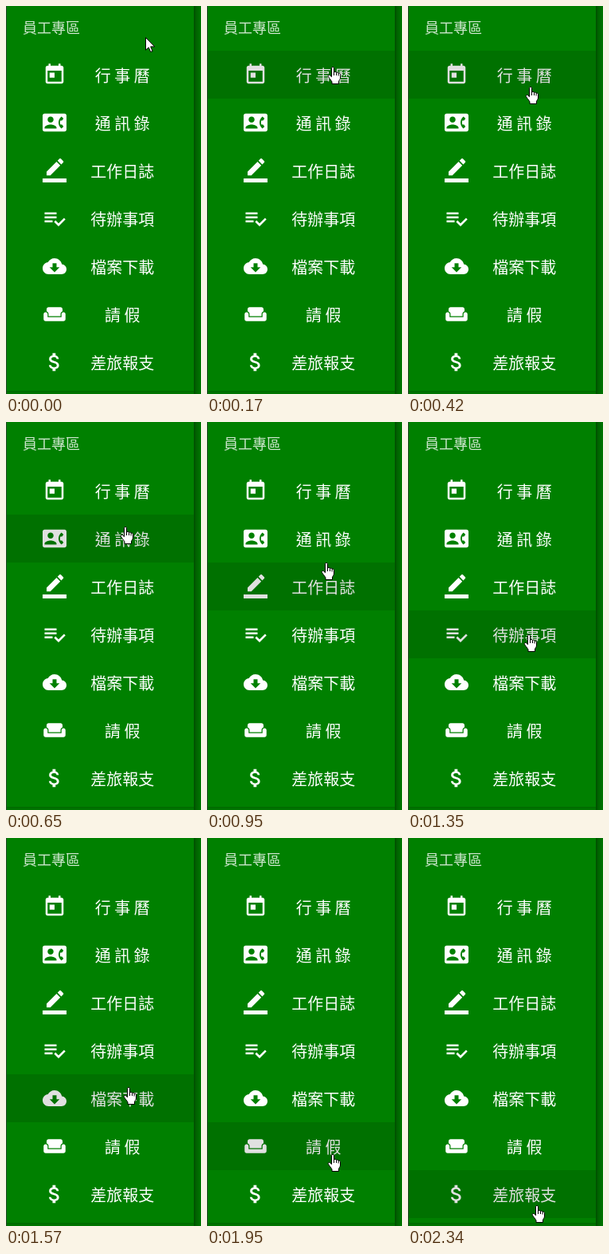
These frames come from a looping animation (245 px wide and 486 px high, 2490 ms). An HTML page:

```html
<!DOCTYPE html>
<html lang="zh-Hant">
<head>
<meta charset="utf-8">
<title>員工專區</title>
<style>
html, body { margin: 0; width: 100%; height: 100%; overflow: hidden; background: #008000; }
svg { display: block; width: 100%; height: 100%; }
text { font-family: "Noto Sans CJK TC", "Noto Sans CJK", "Noto Sans CJK JP", sans-serif; font-weight: 300; fill: #fff; }
.item { font-size: 20px; text-anchor: middle; }
</style>
</head>
<body>
<svg viewBox="0 0 245 486" xmlns="http://www.w3.org/2000/svg">
  <defs>
    <linearGradient id="side">
      <stop offset="0" stop-opacity=".4"/>
      <stop offset=".35" stop-opacity=".22"/>
      <stop offset="1" stop-opacity=".08"/>
    </linearGradient>
    <linearGradient id="foot" x2="0" y2="1">
      <stop offset="0" stop-opacity=".18"/>
      <stop offset="1" stop-opacity=".06"/>
    </linearGradient>
  </defs>
  <rect width="245" height="486" fill="#008000"/>
  <rect x="236" width="9" height="486" fill="url(#side)"/>
  <rect y="482" width="236" height="4" fill="url(#foot)"/>
  <text x="21" y="33.5" font-size="18" fill-opacity=".8">員工專區</text>
  <g id="menu"></g>
  <rect id="hover" width="236" height="60" fill-opacity=".12"/>
  <rect width="1" height="486" fill="#244a28"/>
  <g id="cursor" fill="#fff" stroke="#000" stroke-linejoin="round">
    <path id="arrow" d="M.5 .5V16.2L4.2 12.8 6.7 18.5 9.1 17.5 6.7 11.9H11.7Z"/>
    <path id="hand" d="M-1.5 1.5c0-1.3 3-1.3 3 0V7c.5-1 2.7-.8 3 .6.6-.9 2.5-.5 2.6.8.8-.6 2.4-.2 2.4 1.2v4.4c0 2-2 3-2 5v2.5H-1v-2.5c-1-2-3.5-4.5-4.6-6.6-.8-1.5 1-2.6 2.2-1.6l1.9 1.9z"/>
    <path id="creases" d="M1.5 7v4M4.5 7.6V11M7.1 8.4V11.5" fill="none"/>
  </g>
</svg>
<script>
const TOP = 56, ROW = 60, LOOP = 2490;

const items = [
  ["行 事 曆", "M19 3h-1V1h-2v2H8V1H6v2H5c-1.11 0-1.99.9-1.99 2L3 19c0 1.1.89 2 2 2h14c1.1 0 2-.9 2-2V5c0-1.1-.9-2-2-2zm0 16H5V8h14v11zM7 10h5v5H7z"],
  ["通 訊 錄", "M22 3H2C.9 3 0 3.9 0 5v14c0 1.1.9 2 2 2h20c1.1 0 1.99-.9 1.99-2L24 5c0-1.1-.9-2-2-2zM8 6c1.66 0 3 1.34 3 3s-1.34 3-3 3-3-1.34-3-3 1.34-3 3-3zm6 12H2v-1c0-2 4-3.1 6-3.1s6 1.1 6 3.1v1zm3.85-4h1.64L21 16l-1.99 1.99c-1.31-.98-2.28-2.38-2.73-3.99-.18-.64-.28-1.31-.28-2s.1-1.36.28-2c.45-1.62 1.42-3.01 2.73-3.99L21 8l-1.51 2h-1.64c-.22.63-.35 1.3-.35 2s.13 1.37.35 2z"],
  ["工作日誌", "M17.75 7L14 3.25l-10 10V17h3.75l10-10zm2.96-2.96c.39-.39.39-1.02 0-1.41L18.37.29c-.39-.39-1.02-.39-1.41 0L15 2.25 18.75 6l1.96-1.96zM0 20h24v4H0z"],
  ["待辦事項", "M14 10H2v2h12v-2zm0-4H2v2h12V6zM2 16h8v-2H2v2zm19.5-4.5L23 13l-6.99 7-4.51-4.5L13 14l3.01 3 5.49-5.5z"],
  ["檔案下載", "M19.35 10.04C18.67 6.59 15.64 4 12 4 9.11 4 6.6 5.64 5.35 8.04 2.34 8.36 0 10.91 0 14c0 3.31 2.69 6 6 6h13c2.76 0 5-2.24 5-5 0-2.64-2.05-4.78-4.65-4.96zM17 13l-5 5-5-5h3V9h4v4h3z"],
  ["請 假", "M21 10c-1.1 0-2 .9-2 2v3H5v-3c0-1.1-.9-2-2-2s-2 .9-2 2v5c0 1.1.9 2 2 2h18c1.1 0 2-.9 2-2v-5c0-1.1-.9-2-2-2zm-3-5H6c-1.1 0-2 .9-2 2v2.15c1.16.41 2 1.51 2 2.82V14h12v-2.03c0-1.3.84-2.4 2-2.82V7c0-1.1-.9-2-2-2z"],
  ["差旅報支", "M11.8 10.9c-2.27-.59-3-1.2-3-2.15 0-1.09 1.01-1.85 2.7-1.85 1.78 0 2.44.85 2.5 2.1h2.21c-.07-1.72-1.12-3.3-3.21-3.81V3h-3v2.16c-1.94.42-3.5 1.68-3.5 3.61 0 2.31 1.91 3.46 4.7 4.13 2.5.6 3 1.48 3 2.41 0 .69-.49 1.79-2.7 1.79-2.06 0-2.87-.92-2.98-2.1h-2.2c.12 2.19 1.76 3.42 3.68 3.83V21h3v-2.15c1.95-.37 3.5-1.5 3.5-3.55 0-2.84-2.43-3.81-4.7-4.4z"]
];

// The pointer moves in steps at these times (ms).
const steps = [0, 70, 120, 170, 250, 330, 410, 490, 570, 650, 720, 800, 880, 960, 1040, 1120,
  1190, 1270, 1350, 1420, 1500, 1570, 1650, 1720, 1800, 1880, 1950, 2030, 2110, 2180, 2260, 2340];

// Pointer path: time, x, y.
const path = [
  [0, 175, 39], [70, 170, 48], [170, 158, 76], [570, 151, 118], [650, 150, 131],
  [1120, 150, 222], [1190, 150, 232], [1570, 154, 312], [1650, 154, 328],
  [1950, 158, 396], [2180, 158, 432], [2340, 162, 460]
];

const $ = id => document.getElementById(id);
const show = (id, on) => $(id).setAttribute("visibility", on ? "visible" : "hidden");

$("menu").innerHTML = items.map(([label, icon], i) => {
  const y = TOP + ROW * i;
  return `<path d="${icon}" fill="#fff" transform="translate(46 ${y + 15}) scale(1.25)"/>` +
    `<text class="item" x="146.2" y="${y + 39}">${label}</text>`;
}).join("");

function pointAt(t) {
  const i = path.findIndex(p => p[0] >= t);
  if (i < 1) return path[0].slice(1);
  const [t0, x0, y0] = path[i - 1], [t1, x1, y1] = path[i];
  const k = (t - t0) / (t1 - t0);
  return [x0 + (x1 - x0) * k, y0 + (y1 - y0) * k].map(Math.round);
}

function draw(now) {
  const t = now % LOOP;
  const [x, y] = pointAt(steps.filter(s => s <= t).pop());
  const row = Math.floor((y - TOP) / ROW);
  const over = row >= 0;
  $("cursor").setAttribute("transform", `translate(${x} ${y})`);
  $("hover").setAttribute("y", TOP + ROW * row);
  show("hover", over);
  show("hand", over);
  show("creases", over);
  show("arrow", !over);
}

let start;
function tick(now) {
  start ??= now;
  draw(Math.max(0, now - start));
  requestAnimationFrame(tick);
}
draw(0);
requestAnimationFrame(tick);
</script>
</body>
</html>
```
